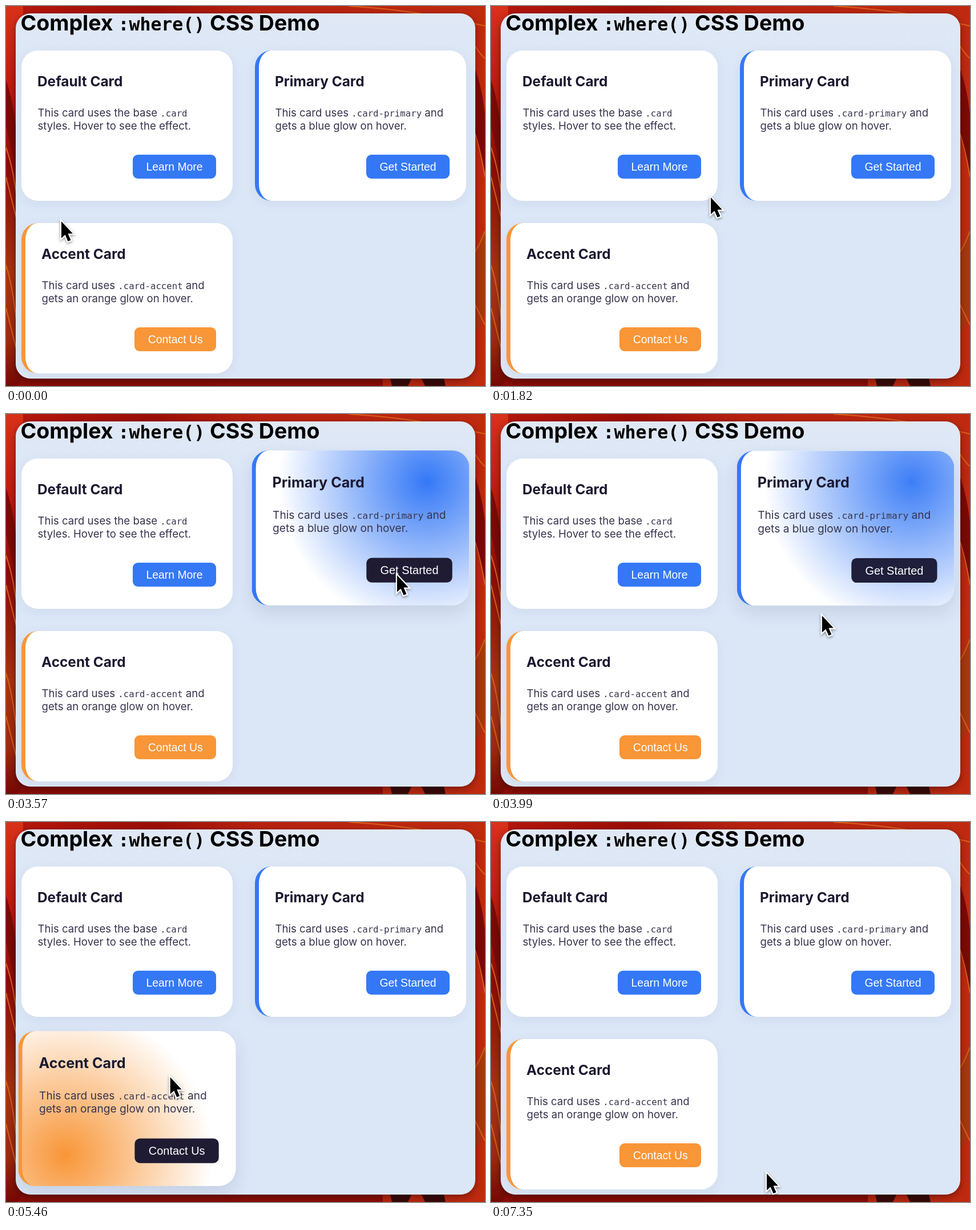
These frames come from a looping animation (839x667 px, 7.42 s). An HTML page:

```html
<!DOCTYPE html>
<html lang="en">
<head>
<meta charset="utf-8">
<title>Complex :where() CSS Demo</title>
<style>
html, body { margin: 0; width: 100%; height: 100%; overflow: hidden; background: #a90f09; }
#stage { position: relative; width: 839px; height: 667px; overflow: hidden;
  font-family: Inter, "Noto Sans", sans-serif; font-optical-sizing: none; white-space: nowrap; }
#wall, #cursor { position: absolute; left: 0; top: 0; }
#panel { position: absolute; left: 17px; top: 13px; width: 805px; height: 641px;
  border-radius: 26px; background: linear-gradient(#e0e8f5, #dbe7f7 15%); box-shadow: 0 4px 14px #0006; }
h1, h2, p, button { position: absolute; margin: 0; }
h1 { left: 25.5px; top: 5.5px; font-size: 37.5px; line-height: 48px; color: #000; }
code { font-family: "DejaVu Sans Mono", monospace; line-height: 0; }
h1 code { font-size: 31.5px; }
.card { --h: 0; --c: #3478f6; position: absolute; box-sizing: border-box; width: 370px; height: 264px;
  border-radius: 29px; background: #fff; overflow: hidden;
  transform: translateY(calc(var(--h) * -10px)) scale(calc(1 + .03 * var(--h)));
  box-shadow: 0 calc(5px + 7px * var(--h)) calc(20px + 9px * var(--h)) rgba(35, 45, 90, calc(.06 + .06 * var(--h))); }
.primary, .accent { border-left: 7.5px solid var(--c); }
.accent { --c: #f89638; }
.card::before { position: absolute; inset: 0; opacity: var(--h); }
.primary::before { content: ""; background: radial-gradient(circle at 80% 20%, var(--c), transparent 70%); }
.accent::before { content: ""; background: radial-gradient(circle at 20% 80%, var(--c), transparent 70%); }
h2 { left: 28px; top: 39px; font-size: 24.4px; line-height: 30px; color: #1b1930; }
p { left: 28.5px; top: 98px; font-size: 18.6px; line-height: 23.3px; color: #36344e; }
p code { font-size: 15.7px; }
button { right: 29px; top: 183.3px; height: 42px; padding: 0 23.4px; border: 0; border-radius: 9px; color: #fff;
  font: 19.4px/42px "Liberation Sans", Arial, sans-serif;
  background: color-mix(in srgb, #1e1b33 calc(var(--h) * 100%), var(--c)); }
</style>
</head>
<body>
<div id="stage">
  <svg id="wall" width="839" height="667" fill="none">
    <defs>
      <linearGradient id="red" x2="1" y2="0">
        <stop stop-color="#b8180c"/><stop offset=".3" stop-color="#9c0e07"/>
        <stop offset=".52" stop-color="#b8220f"/><stop offset="1" stop-color="#c02a10"/>
      </linearGradient>
      <linearGradient id="side" x2="0" y2="1">
        <stop stop-color="#d8321a"/><stop offset=".22" stop-color="#c01a10"/>
        <stop offset=".42" stop-color="#8c0b07"/><stop offset=".7" stop-color="#a8330f"/>
        <stop offset=".88" stop-color="#a02a0e"/><stop offset="1" stop-color="#760805"/>
      </linearGradient>
    </defs>
    <path fill="url(#red)" d="M0 0H839V667H0Z"/>
    <path fill="url(#side)" d="M0 0H30V667H0Z"/>
    <path fill="#8c0d07" d="M30 650H660V667H20Z"/>
    <path fill="#7d0a06" d="M815 95Q832 130 839 190V300Q824 230 815 210ZM0 130Q14 170 20 240V300L0 210Z"/>
    <path fill="#a8380f" d="M815 440L839 390V540L815 590Z"/>
    <path fill="#3a0a07" d="M672 650H712L704 667H676ZM726 650H766L770 667H734Z"/>
    <path stroke="#d9601f" stroke-width="2" d="M0 248Q13 285 20 345M0 300L20 380M0 455Q12 490 20 570M0 530L20 610M815 60Q830 85 839 92M815 205Q830 245 839 300M839 395Q828 425 815 440M815 510L839 560M600 0Q720 7 839 35"/>
  </svg>
  <div id="panel"></div>
  <h1>Complex <code>:where()</code> CSS Demo</h1>
  <div class="card" style="left:27px;top:78px">
    <h2>Default Card</h2>
    <p>This card uses the base <code>.card</code><br>styles. Hover to see the effect.</p>
    <button>Learn More</button>
  </div>
  <div class="card primary" style="left:436px;top:78px">
    <h2>Primary Card</h2>
    <p>This card uses <code>.card-primary</code> and<br>gets a blue glow on hover.</p>
    <button>Get Started</button>
  </div>
  <div class="card accent" style="left:27px;top:381px">
    <h2>Accent Card</h2>
    <p>This card uses <code>.card-accent</code> and<br>gets an orange glow on hover.</p>
    <button>Contact Us</button>
  </div>
  <svg id="cursor" width="40" height="50" overflow="visible" style="filter:drop-shadow(0 2px 2px #0006)">
    <path d="M0 0V29.5L6.5 23.5L11.5 35L16.5 33L11.5 21.5H20Z" fill="#000" stroke="#fff" stroke-width="4.4" paint-order="stroke"/>
  </svg>
</div>
<script>
const LOOP = 7420, STEP = 70, FADE = 320;
const cards = [...document.querySelectorAll('.card')];
const cursor = document.getElementById('cursor');

// time, x, y
const path = [
  [0, 97, 378], [700, 97, 378], [1820, 385, 336], [2400, 316, 280], [2850, 316, 280],
  [3500, 685, 283], [3750, 685, 283], [4500, 250, 577], [5150, 250, 577],
  [5800, 331, 300], [6300, 331, 300], [6650, 414, 365], [7100, 483, 617], [LOOP, 483, 617]
];
// card, enter time, leave time
const hovers = [[0, 1830, 3050], [1, 3100, 3950], [2, 4210, 5590], [0, 5640, 6450]];

const ease = u => { u = Math.min(1, Math.max(0, u)); return u * u * (3 - 2 * u); };

function draw(t) {
  const i = path.findIndex(k => k[0] > t);
  const [t0, x0, y0] = path[i - 1], [t1, x1, y1] = path[i];
  const u = ease((t - t0) / (t1 - t0));
  cursor.style.transform = `translate(${x0 + (x1 - x0) * u}px, ${y0 + (y1 - y0) * u}px)`;

  const level = [0, 0, 0];
  for (const [card, enter, leave] of hovers)
    level[card] += ease((t - enter) / FADE) - ease((t - leave) / FADE);
  cards.forEach((c, n) => {
    c.style.setProperty('--h', level[n].toFixed(4));
    c.style.zIndex = level[n] > 0 ? 1 : 0;
  });
  cursor.style.zIndex = 2;
}

const start = performance.now();
function tick() {
  const t = (performance.now() - start) % LOOP;
  draw(Math.floor(t / STEP) * STEP);
  requestAnimationFrame(tick);
}
tick();
</script>
</body>
</html>
```
